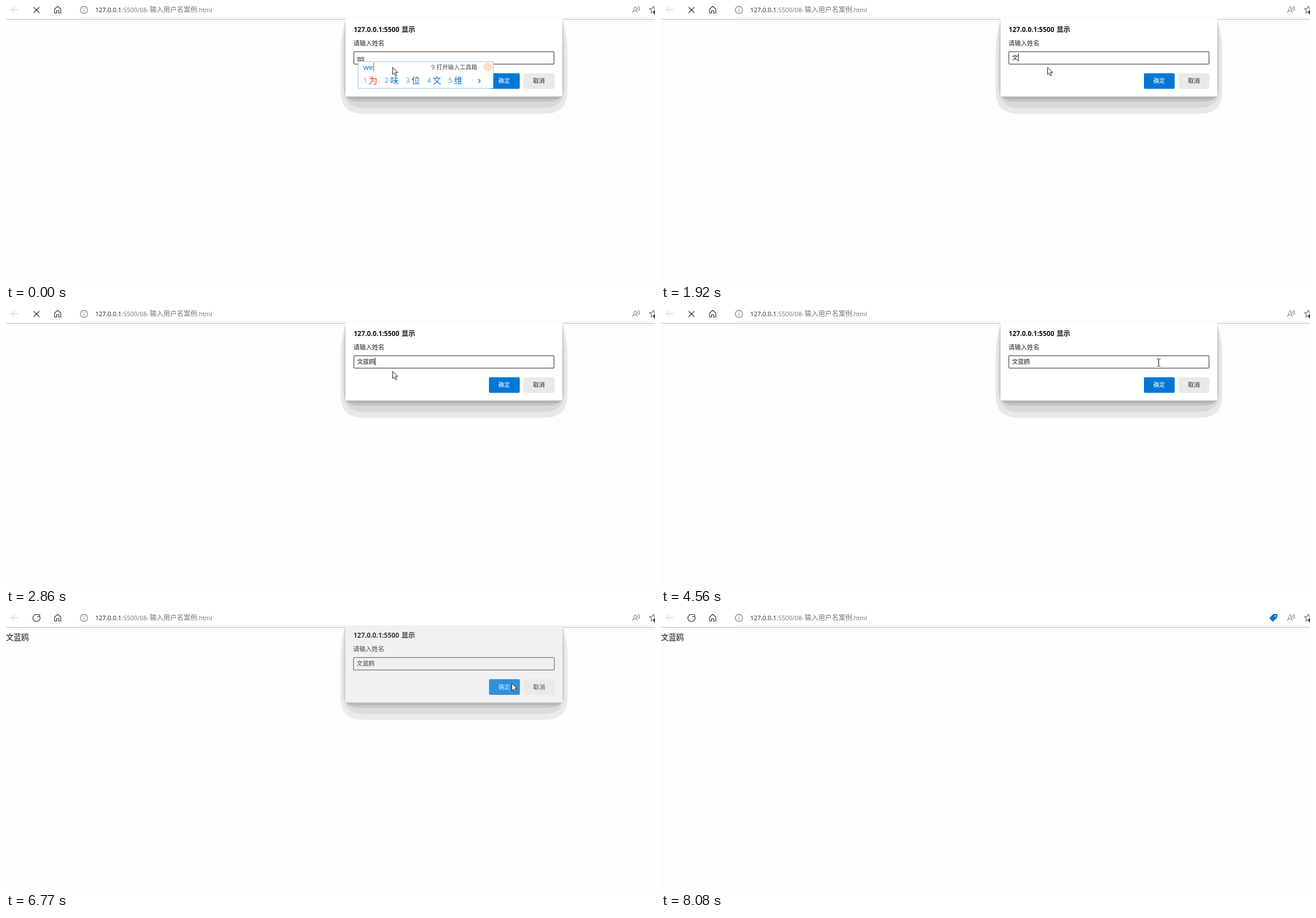
Recreate the animation shown at these times as an HTML page with a canvas. Size 1149 by 488 pixels, loop 8.69 s.

```html
<!DOCTYPE html>
<html lang="zh">
<head>
<meta charset="utf-8">
<style>
html, body { margin: 0; width: 100%; height: 100%; overflow: hidden; background: #fdfdfd; }
canvas { display: block; }
</style>
</head>
<body>
<canvas id="stage" width="1149" height="488"></canvas>
<script>
const c = document.getElementById('stage').getContext('2d');
const LOOP = 8690;
const LATIN = '"Open Sans", "Noto Sans", sans-serif';
const HAN = '"Noto Sans CJK SC", "Noto Sans CJK", sans-serif';
const BLUE = '#0a6fd6', RED = '#f0301c';
const NAME = '文蓝鸥';

// [time, x, y, shape]
const mouse = [
  [0, 684, 108, 'arrow'],
  [3730, 700, 92, 'beam'], [3850, 735, 45, 'arrow'], [3970, 775, 4, 'arrow'],
  [4090, 820, 0, 'arrow'], [4210, 868, 40, 'arrow'], [4320, 892, 108, 'arrow'],
  [4440, 885, 97, 'beam'], [4560, 881, 93, 'beam'],
  [6170, 885, 106, 'arrow'], [6290, 895, 121, 'arrow'], [6430, 895, 122.5, 'arrow'],
  [7240, 810, 108, 'arrow'], [7360, 660, 140, 'arrow'], [7480, 556, 205, 'arrow'],
  [7600, 680, 262, 'arrow'], [7720, 850, 300, 'arrow'], [7840, 1000, 317, 'arrow'],
  [7960, 1088, 319, 'arrow'], [8080, 0, 0, 'none']
];

// [time, committed text, letters being typed, candidates]
const typing = [
  [0, '', 'we', ['为', '味', '位', '文', '维']],
  [230, '', 'wen', ['文', '问', '温暖', '文字', '稳']],
  [1800, '', 'wen', null],
  [1920, '文', '', null],
  [2170, '文', 'l', ['了', '来', '里', '老', '两']],
  [2285, '文', 'la', ['拉', '啦', '辣', '蜡', '喇']],
  [2400, '文', 'lan', ['蓝', '兰', '栏', '懒', '烂']],
  [2515, '文', "lan'o", ['蓝鸥', '蓝', '兰', '栏']],
  [2630, '文', "lan'ou", ['蓝鸥', '蓝', '兰', '栏']],
  [2860, NAME, '', null]
];

// [time, visible]
const blink = [
  [0, 0], [230, 1], [810, 0], [1310, 1], [1800, 0], [1920, 1], [3360, 0],
  [3850, 1], [4320, 0], [4920, 1], [5420, 0], [6050, 1], [6430, 0]
];

// [time, opacity, rise]
const closing = [[0, 1, 0], [6670, .8, 4], [6780, .4, 11], [6890, .11, 15.4], [6990, 0, 16]];

const at = (list, t) => list.filter(k => k[0] <= t).pop();

function rect(x, y, w, h, color, r = 0) {
  c.fillStyle = color;
  c.beginPath();
  c.roundRect(x, y, w, h, r);
  c.fill();
}

function line(points, color, width = 1) {
  c.strokeStyle = color;
  c.lineWidth = width;
  c.beginPath();
  points.forEach(([x, y], i) => i ? c.lineTo(x, y) : c.moveTo(x, y));
  c.stroke();
}

function ring(x, y, r, color, from = 0, to = 7) {
  c.strokeStyle = color;
  c.lineWidth = 1.1;
  c.beginPath();
  c.arc(x, y, r, from, Math.min(to, from + Math.PI * 2));
  c.stroke();
}

function text(s, x, y, size, color, family = HAN, weight = 400) {
  c.font = `${weight} ${size}px ${family}`;
  c.fillStyle = color;
  c.fillText(s, x, y);
  return c.measureText(s).width;
}

function toolbar(t) {
  const done = t >= 6670;
  rect(0, 0, 1149, 23, '#fff');
  rect(128, 20, 1021, 1, '#f0f0f0');
  rect(0, 23, 1149, 1, '#bcbcbc');

  line([[22, 6.5], [9.5, 6.5]], '#c9c9c9');
  line([[15, 1], [9.5, 6.5], [15, 12]], '#c9c9c9');

  if (done) {
    ring(54, 7, 6.4, '#222', -.35, 5.3);
    line([[59.5, 0], [59.5, 4.5], [55, 4.5]], '#222', 1.2);
  } else {
    line([[49, 2], [59, 12]], '#333', 1.2);
    line([[59, 2], [49, 12]], '#333', 1.2);
  }

  line([[86, 5.5], [91.5, .5], [97, 5.5], [97, 12.5], [93.5, 12.5], [93.5, 8],
    [89.5, 8], [89.5, 12.5], [86, 12.5], [86, 5.5]], '#333', 1.2);

  ring(138, 7, 6.4, '#777');
  rect(137.5, 6, 1, 5, '#777');
  rect(137.5, 3, 1, 1.4, '#777');

  text('127.0.0.1', 158, 11, 11, '#222', LATIN);
  text(':5500/08-', 204.5, 11, 11, '#747474', LATIN);
  text('输入用户名案例', 254.5, 11, 12, '#747474');
  text('.html', 338.5, 11, 11, '#747474', LATIN);

  line([[1109, 12], [1113.5, 1], [1118, 12]], '#777');
  line([[1110.5, 8.5], [1116.5, 8.5]], '#777');
  ring(1115, 5, 3.5, '#777', -.8, .6);
  ring(1115, 5, 6.5, '#777', -.8, .6);

  const star = [];
  for (let i = 0; i <= 10; i++) {
    const a = -Math.PI / 2 + i * Math.PI / 5, r = i % 2 ? 3.2 : 7;
    star.push([1146 + r * Math.cos(a), 7 + r * Math.sin(a)]);
  }
  line(star, '#666', 1.1);
  c.fillStyle = '#444';
  c.beginPath();
  c.arc(1150, 11, 4, 0, 7);
  c.fill();

  if (t >= 6990) {
    c.fillStyle = '#0d74d1';
    c.beginPath();
    [[1077, 7], [1084, 0], [1091, 0], [1091, 6], [1083, 14]].forEach(p => c.lineTo(...p));
    c.fill();
    c.fillStyle = '#ffd34d';
    c.beginPath();
    c.arc(1087.5, 3.5, 1.5, 0, 7);
    c.fill();
  }
}

function band(left, right, bottom, r, color) {
  c.fillStyle = color;
  c.beginPath();
  c.moveTo(601, 24);
  c.quadraticCurveTo(left, 50, left, 85);
  c.lineTo(left, bottom - r);
  c.quadraticCurveTo(left, bottom, left + r, bottom);
  c.lineTo(right - r, bottom);
  c.quadraticCurveTo(right, bottom, right, bottom - r);
  c.lineTo(right, 85);
  c.quadraticCurveTo(right, 50, 985, 24);
  c.fill();
}

function shadow() {
  band(592.5, 994, 190.5, 40, '#e8e8e8');
  band(597, 989, 180, 36, '#d8d8d8');
  band(599.5, 986.5, 169.5, 26, '#c6c6c6');
  band(600.3, 985.7, 165, 14, '#b6b6b6');
}

function composer(x, letters, words) {
  let end = x + 10;
  const spots = words.map(w => {
    const spot = end;
    end += 22.7 + 15 * w.length;
    return spot;
  });
  const right = end + 41.5;
  rect(x, 98, right - x, 47.5, '#fff', 1);
  c.strokeStyle = '#9cc6ec';
  c.lineWidth = 1;
  c.strokeRect(x + .5, 98.5, right - x - 1, 47);

  const w = text(letters, x + 9.5, 112.5, 13, BLUE, LATIN);
  rect(x + 10 + w, 100, 1, 16, RED);
  text('9', right - 110, 112, 10.5, '#555', LATIN);
  text('打开输入工具箱', right - 101, 112, 10.3, '#444');
  c.fillStyle = '#fbdccd';
  c.beginPath();
  c.arc(right - 10, 108, 8, 0, 7);
  c.fill();

  words.forEach((word, i) => {
    text(i + 1, spots[i] - .5, 135.5, 12, i ? '#4d95df' : '#f56a5c', LATIN);
    text(word, spots[i] + 9.5, 136.8, 15, i ? BLUE : RED);
  });
  line([[right - 35, 129.5], [right - 38, 132.5], [right - 35, 135.5]], '#d5d5d5');
  line([[right - 27, 129], [right - 23.5, 132.5], [right - 27, 136]], BLUE, 1.3);
}

function dialog(t) {
  const [, alpha, rise] = at(closing, t);
  if (!alpha) return;
  const [, done, letters, words] = at(typing, t);
  const faint = alpha < .3;

  c.save();
  c.globalAlpha = alpha;
  if (rise) {
    c.translate(793, -rise);
    c.scale(1 + rise / 1540, 1 + rise / 1540);
    c.translate(-793, 0);
  }
  if (!faint) {
    shadow();
    rect(601, 21, 384, 139, '#fff', 2);
    c.lineWidth = 1.5;
    c.strokeStyle = '#696d72';
    c.beginPath();
    c.roundRect(615.75, 80.75, 354.5, 22, 2);
    c.stroke();
  } else {
    c.strokeStyle = '#999';
    c.lineWidth = 2.5;
    c.beginPath();
    c.moveTo(605, 162);
    c.quadraticCurveTo(618, 164, 640, 164);
    c.lineTo(946, 164);
    c.quadraticCurveTo(968, 164, 981, 162);
    c.stroke();
  }

  text('127.0.0.1:5500', 615.5, 46, 11.8, '#111', LATIN, 700);
  text('显示', 700.5, 46.3, 12, '#111', HAN, 700);
  text('请输入姓名', 615, 70.2, 11, '#222');

  let x = 621.5;
  if (done) x += text(done, x, 95.2, 10.5, '#111');
  if (letters) {
    const w = text(letters, x, 95, 9.8, '#111', LATIN);
    rect(x, 96, w, 1, '#222');
    x += w;
  }
  if (at(blink, t)[1]) rect(Math.round(x), 84, 1, 14, '#111');

  rect(855, 119, 54.5, 27.5, '#0078d7', 2);
  rect(916, 119, 55, 27.5, '#e9e9e9', 2);
  text('确定', 871.5, 136.2, 10.5, '#fff', HAN, 500);
  text('取消', 933, 136.2, 10.5, '#222', HAN, 500);
  if (words) composer(done ? 634 : 623, letters, words);
  c.restore();
}

function pointer(t) {
  const [, x, y, shape] = at(mouse, t);
  c.save();
  c.translate(x, y);
  if (shape === 'arrow') {
    c.beginPath();
    [[.5, .5], [.5, 13], [3.4, 10.3], [5.6, 15.5], [7.8, 14.6], [5.6, 9.6], [9.5, 9.4]]
      .forEach(p => c.lineTo(...p));
    c.closePath();
    c.fillStyle = '#fff';
    c.fill();
    c.strokeStyle = '#222';
    c.lineWidth = 1;
    c.stroke();
  } else if (shape === 'beam') {
    rect(-.5, -6, 1.2, 12, '#222');
    for (const top of [-7, 6]) {
      rect(-3, top, 2.5, 1, '#222');
      rect(.7, top, 2.5, 1, '#222');
    }
  }
  c.restore();
}

function draw(now) {
  const t = now % LOOP;
  rect(0, 0, 1149, 488, '#fdfdfd');
  toolbar(t);
  if (t >= 6670) text(NAME, 0, 46, 13.5, '#111');
  dialog(t);
  pointer(t);
}

const start = performance.now();
function tick() {
  draw(performance.now() - start);
  requestAnimationFrame(tick);
}
tick();
</script>
</body>
</html>
```
